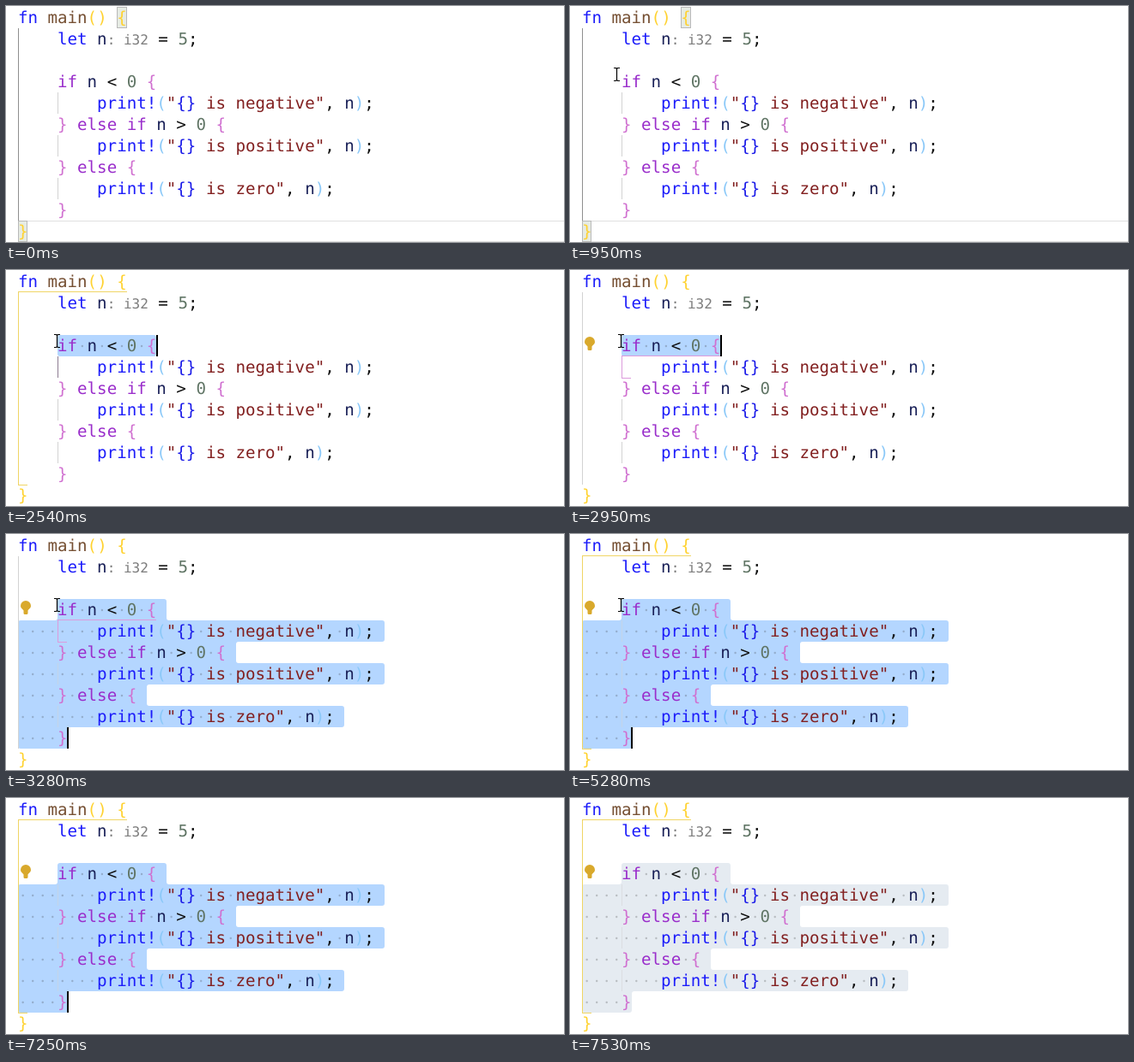
Animation, 650 px wide and 276 px high, one loop 7.58 s. Source, as an HTML page:

```html
<!DOCTYPE html>
<html lang="en">
<head>
<meta charset="utf-8">
<title>Expanding a code selection</title>
<style>
  html, body { margin: 0; width: 100%; height: 100%; overflow: hidden; background: #fff; }
  svg, pre { position: absolute; left: 0; top: 0; }
  pre {
    margin: 0; left: 13.9px; top: 1px; color: #111;
    font: 19.15px/25px "DejaVu Sans Mono", monospace;
    text-rendering: geometricPrecision; font-variant-ligatures: none;
  }
  .keyword { color: #1c1cfa; }
  .name { color: #754f32; }
  .flow { color: #9a2ecb; }
  .text { color: #822020; }
  .slot { color: #1c1ce8; }
  .number { color: #5f7464; }
  .variable { color: #1a2158; }
  .hint { color: #7c7c7c; font-size: 16px; line-height: 0; }
</style>
</head>
<body>
<svg id="back" width="650" height="276"></svg>
<pre id="code"></pre>
<svg width="650" height="276">
  <path id="bulb" fill="#d9a92c" d="M20.5 89.5C20 88 17 87 17 84a6 6 0 0 1 12 0C29 87 26 88 25.5 89.5V92.5q0 1.5-1.5 1.5h-2q-1.5 0-1.5-1.5z"/>
  <rect id="caret" width="2" height="25"/>
  <path id="mouse" d="M-3-7.5h2.5l1 1 1-1h2.5M.5-6.5V6.5M-3 7.5h2.5l1-1 1 1h2.5" fill="none" stroke="#000" stroke-width="1.2"/>
</svg>
<script>
const LOOP = 7580, LEFT = 13.9, CHAR = 11.53, LINE = 25;
const $ = id => document.getElementById(id);
const colX = col => Math.round(LEFT + col * CHAR);
const rowY = row => 1 + row * LINE;

const source = `fn main() {
    let n: i32 = 5;

    if n < 0 {
        print!("{} is negative", n);
    } else if n > 0 {
        print!("{} is positive", n);
    } else {
        print!("{} is zero", n);
    }
}`;
const rows = source.split("\n");

// Syntax colours; brackets are coloured by nesting depth.
const span = (kind, s) => `<span class="${kind}">${s}</span>`;
const bracketColors = ["#ffd230", "#d070d0", "#8ac8f8"];
const grammar = /(?<text>"[^"]*")|(?<keyword>\b(fn|let)\b|print!)|(?<name>main)|(?<flow>\b(if|else)\b)|(?<hint>: i32)|(?<number>\d)|(?<variable>\bn\b)|(?<bracket>[(){}])|</g;
let depth = 0;
$("code").innerHTML = source.replace(grammar, (token, ...rest) => {
  if (token === "<") return "&lt;";
  const groups = rest.at(-1);
  const kind = Object.keys(groups).find(key => groups[key]);
  if (kind === "bracket") {
    const level = "({".includes(token) ? depth++ : --depth;
    return `<span style="color:${bracketColors[level]}">${token}</span>`;
  }
  return span(kind, token.replace("{}", span("slot", "{}")));
});

// Closed outline with 3px rounded corners, for axis-aligned points.
function rounded(points) {
  const toward = ([x, y], [u, v]) => [x + 3 * Math.sign(u - x), y + 3 * Math.sign(v - y)];
  const count = points.length;
  return "M" + points.map((p, i) =>
    `${toward(p, points[(i + count - 1) % count])}Q${p} ${toward(p, points[(i + 1) % count])}`
  ).join("L") + "z";
}

function selection(last) {
  const points = [[colX(4), rowY(3)]];
  for (let row = 3; row <= last; row++) {
    const x = colX(rows[row].length + (row < last));
    points.push([x, rowY(row)], [x, rowY(row + 1)]);
  }
  if (last > 3) points.push([14, rowY(last + 1)], [14, rowY(4)]);
  points.push([colX(4), rowY(4)]);
  return rounded(points);
}

function spaceDots(first, last) {
  let dots = "";
  for (let row = first; row <= last; row++)
    [...rows[row]].forEach((c, col) => {
      if (c === " " && (row > 3 || col > 3))
        dots += `<circle cx="${LEFT + (col + .5) * CHAR}" cy="${rowY(row) + 13}" r="1.2"/>`;
    });
  return dots;
}

const rect = (x, y, w, h, fill, id = "") =>
  `<rect ${id && `id="${id}"`} x="${x}" y="${y}" width="${w}" height="${h}" fill="${fill}"/>`;
const currentLine = (id, row) => `<g id="${id}">
  ${rect(14, rowY(row), 636, 1, "#e0e0e0")}${rect(14, rowY(row) + 24, 636, 1, "#e0e0e0")}</g>`;
const matchBox = (col, row) =>
  `<rect x="${colX(col) + .5}" y="${rowY(row) + .5}" width="${colX(col + 1) - colX(col) - 1}" height="24" fill="#e6ebe4" stroke="#b9b9b9"/>`;
// Scope outline: under the opening bracket, down the side, over the closing bracket.
const scope = (id, col, row, endCol, endRow, color) => `<g id="${id}">
  ${rect(colX(col), rowY(row + 1) - 1, colX(endCol) - colX(col), 1, color)}
  ${rect(colX(col), rowY(row + 1), 1, (endRow - row - 1) * LINE, color)}
  ${rect(colX(col), rowY(endRow), 11, 1, color)}</g>`;

$("back").innerHTML = `
  ${currentLine("lastLine", 10)}
  ${currentLine("clickedLine", 3)}
  <path id="lineSelection" d="${selection(3)}" fill="#b4d6ff"/>
  <path id="blockSelection" d="${selection(9)}"/>
  ${rect(14, 26, 1, 225, "#d3d3d3", "outerGuide")}
  <g id="innerGuides">${[4, 6, 8].map(row => rect(60, rowY(row), 1, LINE, "#d3d3d3")).join("")}</g>
  ${rect(60, 101, 1, LINE, "#8d7c92", "activeGuide")}
  <g id="boxes">${matchBox(10, 0)}${matchBox(0, 10)}</g>
  ${scope("outerScope", 0, 0, 11, 10, "#f0d565")}
  ${scope("innerScope", 4, 3, 14, 5, "#dc9bdc")}
  <g fill="#333" fill-opacity=".25">
    <g id="lineDots">${spaceDots(3, 3)}</g>
    <g id="blockDots">${spaceDots(4, 9)}</g>
  </g>`;

const CLICK = 1110, SELECT_LINE = 2540, SELECT_BLOCK = 3280, BLUR = 7530;
const blinks = [CLICK, 1620, 2130, 3790, 4310, 4770, 5280, 5790, 6250, 6760, 7250, BLUR];
const mousePath = [
  [80, 316, 252], [720, 53, 79], [900, 53, 79], [CLICK, 59, 83],
  [6290, 59, 83], [6370, 51, 100], [6600, 237, 265]
];

function mouseAt(t) {
  const next = mousePath.findIndex(key => key[0] > t);
  if (next < 1) return mousePath.at(next).slice(1);
  const [t0, x0, y0] = mousePath[next - 1], [t1, x1, y1] = mousePath[next];
  const u = (t - t0) / (t1 - t0), k = u * u * (3 - 2 * u);
  return [Math.round(x0 + (x1 - x0) * k), Math.round(y0 + (y1 - y0) * k)];
}

const show = (id, on) => $(id).style.display = on ? "" : "none";

function draw(t) {
  const during = (from, to) => t >= from && t < to;
  show("lastLine", t < CLICK);
  show("clickedLine", during(CLICK, SELECT_LINE));
  show("boxes", t < SELECT_LINE);
  show("lineSelection", during(SELECT_LINE, SELECT_BLOCK));
  show("blockSelection", t >= SELECT_BLOCK);
  show("lineDots", t >= SELECT_LINE);
  show("blockDots", t >= SELECT_BLOCK);
  show("bulb", t >= 2770);
  show("outerScope", during(1240, 2950) || t >= 3330);
  show("innerScope", during(2950, 3330));
  show("activeGuide", during(CLICK, 2950));
  $("outerGuide").setAttribute("fill", t < 1240 ? "#8f8f8f" : "#d3d3d3");
  $("innerGuides").setAttribute("opacity", t < SELECT_BLOCK ? 1 : .5);
  $("blockSelection").setAttribute("fill", t < BLUR ? "#b4d6ff" : "#e5ebf1");

  show("caret", blinks.filter(time => time <= t).length % 2);
  $("caret").setAttribute("x", t < SELECT_LINE ? 60 : t < SELECT_BLOCK ? 175 : 71);
  $("caret").setAttribute("y", t < SELECT_BLOCK ? rowY(3) : rowY(9));

  show("mouse", during(80, 6610));
  $("mouse").setAttribute("transform", `translate(${mouseAt(t)})`);
}

const start = performance.now();
function tick() {
  draw((performance.now() - start) % LOOP);
  requestAnimationFrame(tick);
}
tick();
</script>
</body>
</html>
```
